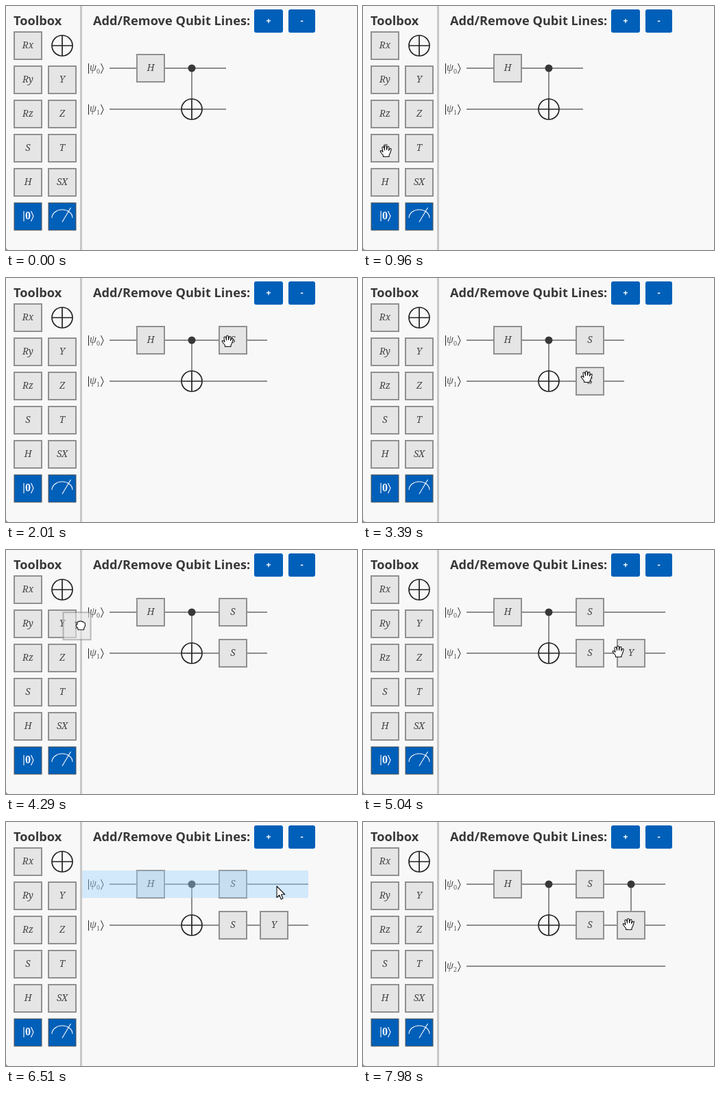
An HTML page that plays this animation: 512x357 px, repeating every 8000 ms.

```html
<!DOCTYPE html>
<html lang="en">
<head>
<meta charset="utf-8">
<title>Circuit editor</title>
<style>
html, body { margin: 0; width: 100%; height: 100%; overflow: hidden; background: #f8f8f8; }
svg { display: block; width: 512px; height: 357px; }
.ui { font-family: "Open Sans", "Noto Sans", sans-serif; }
.title { font-size: 18.2px; font-weight: 700; fill: #383838; }
.gate { font: italic 13.5px "Noto Serif", serif; fill: #444; text-anchor: middle; }
.ket { font: 10px "Liberation Serif", serif; fill: #555; text-anchor: middle; }
.psi { font-size: 16px; font-style: italic; }
.zero { font-size: 16px; font-weight: 700; fill: #fff; }
.line { stroke: #222; fill: none; }
.bold { stroke: #222; stroke-width: 1.7; fill: #f8f8f8; }
.white { stroke: #fff; stroke-width: 1.1; fill: none; }
</style>
</head>
<body>
<svg viewBox="0 0 512 357" xmlns="http://www.w3.org/2000/svg">
  <g id="panel"></g>
  <g id="scene"></g>
</svg>
<script>
const LOOP = 8000, BLUE = '#005fb8';
const panel = document.getElementById('panel');
const scene = document.getElementById('scene');

// Both grids give cell centres
const tool = (col, row) => [32 + 50 * col, 58 + 50 * row];
const slot = (col, row) => [211 + 60 * col, 91 + 60 * row];

const rect = (x, y, w, h, fill, more = '') =>
  `<rect x="${x}" y="${y}" width="${w}" height="${h}" fill="${fill}" ${more}/>`;
const path = (d, cls = 'line') => `<path d="${d}" class="${cls}"/>`;
const label = (x, y, s, cls) => `<text x="${x}" y="${y}" class="${cls}">${s}</text>`;
const box = ([x, y], fill, stroke) => rect(x - 20, y - 20, 40, 40, fill, stroke);
const gate = ([x, y], name) =>
  box([x, y], '#e5e5e5', 'stroke="#909090" stroke-width="2"') + label(x, y + 4, name, 'gate');
const control = ([x, y], end) =>
  path(`M${x} ${y}V${end}`) + `<circle cx="${x}" cy="${y}" r="5.5" fill="#383838"/>`;
const target = ([x, y]) => `<circle cx="${x}" cy="${y}" r="15" class="bold"/>` +
  path(`M${x - 15} ${y}h30M${x} ${y - 15}v30`, 'bold');
const bracket = (x, y, gap) => `M${x} ${y - 7}v15M${x + gap} ${y - 7}l3.5 7.5-3.5 7.5`;
const glow = (x, y, w) => rect(x, y, w, 40, '#99d0ff', 'opacity=".4"');

const wire = (row, end) => {
  const y = slot(0, row)[1];
  return path(bracket(120.5, y, 18)) + label(127, y + 4, 'ψ', 'ket psi') +
    label(134.5, y + 8, row, 'ket') + path(`M151 ${y}H${end}`);
};

const TOOLS = [['Rx'], ['Ry', 'Y'], ['Rz', 'Z'], ['S', 'T'], ['H', 'SX']]
  .flatMap((names, row) => names.map((name, col) => ({ name, at: tool(col, row) })));

function drawPanel() {
  const [zero, meter] = [0, 1].map(col => tool(col, 5));
  const edge = 'stroke="#555"';
  return label(11, 28, 'Toolbox', 'ui title') +
    label(127, 28, 'Add/Remove Qubit Lines:', 'ui title') +
    rect(108, 0, 3, 357, '#c8c8c8') +
    '<path d="M0 352Q0 357 5 357H0Z" fill="#999"/>' +
    TOOLS.map(g => gate(g.at, g.name)).join('') + target(tool(1, 0)) +
    box(zero, BLUE, edge) + label(zero[0], 312, '0', 'ket zero') +
    path(bracket(zero[0] - 6, 307, 10.5), 'white') +
    box(meter, BLUE, edge) + path('M67 310A15 12 0 0 1 97 310M82 316L94.5 295', 'white');
}

const ARROW = 'M0 0V16.5L3.8 13L6.3 19L9 17.8L6.5 12H11.8Z';
const OPEN = 'M5 17V15L1.5 10.5Q0 8.5 1.5 8Q3 8 4.5 10L3.5 4.5Q3.2 2.5 4.8 2.5Q6 2.6 6.3 4L7 7.5V2.2' +
  'Q7.2 .8 8.4 .8Q9.8 .8 9.8 2.2L10 7L11 3Q11.4 1.8 12.5 2Q13.8 2.4 13.5 3.8L13 8L14.5 5.5' +
  'Q15.4 4.6 16.3 5.2Q17 6 16.5 7.2L15 12L13.5 15V17Z';
const CLOSED = 'M5 17V15L2.5 12Q1.5 10 3 9.2L4 9V6.5Q4.3 4.8 6 5.2Q7 4 8.6 4.6Q10.2 4 11.3 5.2' +
  'Q13 4.8 13.6 6.4Q15.4 6.4 15.4 8.4V11.5L13.5 15V17Z';

// Pointer stops: leave, arrive, place, sideways bend of the way there
const ENTRY = [514, 37];
const STOPS = [
  [210, 960, [33, 212], -.05],
  [1020, 1770, [317, 102], .1],
  [1860, 2010, [323, 92], 0],
  [2280, 2310, [326, 92], 0],
  [2550, 3150, [326, 144], 0],
  [3390, 4050, [74, 104], -.08],
  [4050, 4170, [87, 105], 0],
  [4200, 4740, [372, 148], 0],
  [5070, 5190, [375, 156], 0],
  [5280, 5670, [424, 209], 0],
  [5760, 6480, [395, 94], .07],
  [6600, 7290, [383, 24], 0],
  [7440, 7950, [387, 149], -.05]
];

const DRAGS = [
  { start: 1020, drop: 1860, name: 'S', from: tool(0, 3), to: slot(2, 0), adds: true },
  { start: 2550, drop: 3150, name: 'S', from: slot(2, 0), to: slot(2, 1), adds: false },
  { start: 4200, drop: 4920, name: 'Y', from: tool(1, 1), to: slot(3, 1), adds: true }
];
const MENU = { open: 5220, close: 5730, items: ['Toggle Adjoint', 'Add Control', 'Delete'] };
const ADD_CONTROL = 6600, ADD_ROW = 7440;

function pointer(t) {
  const i = STOPS.findLastIndex(s => t >= s[0]);
  if (i < 0) return null;
  const [leave, arrive, to, bend] = STOPS[i];
  const from = i ? STOPS[i - 1][2] : ENTRY;
  const k = Math.min(1, (t - leave) / (arrive - leave));
  const u = k * k * (3 - 2 * k), side = 2 * u * (1 - u) * bend;
  const dx = to[0] - from[0], dy = to[1] - from[1];
  return [from[0] + dx * u - dy * side, from[1] + dy * u + dx * side];
}

const near = (a, b, r) => Math.abs(a[0] - b[0]) < r && Math.abs(a[1] - b[1]) < r;

function button(x, w, sign, hover) {
  return rect(x, 5, w, 34, hover ? '#0256a3' : BLUE, 'rx="3"') +
    `<text x="${x + w / 2}" y="26" class="ui" font-size="13" font-weight="700" fill="#fff" text-anchor="middle">${sign}</text>`;
}

function menu(p) {
  return rect(374, 157, 118, 108, '#000', 'rx="5" opacity=".08"') +
    rect(376, 157, 114, 105, '#fff', 'rx="4" stroke="#d8d8d8"') +
    MENU.items.map((s, i) => {
      const y = 157 + i * 35;
      const hover = p[0] > 376 && p[1] > y && p[1] < y + 35;
      return (hover ? rect(377, y + 1, 112, 33, '#ececec') : '') +
        `<text x="392" y="${y + 22}" class="ui" font-size="12" fill="#333">${s}</text>`;
    }).join('');
}

function ghost(drag, p) {
  const grip = pointer(drag.start);
  const at = drag.from.map((v, i) => v + p[i] - grip[i]);
  // A new column opens in the gap before its gate
  const zone = [drag.to[0] - (drag.adds ? 30 : 0), drag.to[1]];
  return (near(at, zone, 30) ? glow(zone[0] - 20, zone[1] - 20, 40) : '') +
    `<g opacity=".6">${gate(at, drag.name)}</g>`;
}

function cursor([x, y], shape) {
  const [dx, dy] = shape === ARROW ? [0, 0] : [8.5, 8.5];
  return `<path d="${shape}" transform="translate(${x - dx} ${y - dy})" ` +
    'fill="#fff" stroke="#111" stroke-width="1.1" stroke-linejoin="round"/>';
}

function draw(t) {
  const p = pointer(t);
  const dropped = DRAGS.filter(d => t >= d.drop);
  const gates = [{ name: 'H', at: slot(0, 0) }, ...dropped.map(d => ({ name: d.name, at: d.to }))];
  const drag = DRAGS.find(d => t >= d.start && t < d.drop);
  const menuOpen = t >= MENU.open && t < MENU.close;
  const end = 321 + 60 * dropped.filter(d => d.adds).length;
  const rows = t < ADD_ROW ? 2 : 3;

  let out = button(362, 42, '+', p && near(p, [383, 22], 18)) + button(412, 39, '-');
  for (let row = 0; row < rows; row++) out += wire(row, end);
  out += control(slot(1, 0), 136) + target(slot(1, 1));
  if (t >= ADD_CONTROL) out += control(slot(3, 0), 131);
  out += gates.map(g => gate(g.at, g.name)).join('');

  if (t >= MENU.close && t < ADD_CONTROL && p[1] < 111) out += glow(111, 71, end - 111);
  if (menuOpen) out += menu(p);
  if (drag) out += ghost(drag, p);
  if (p) {
    const over = !menuOpen && [...TOOLS, ...gates].some(g => near(p, g.at, 21));
    out += cursor(p, drag ? CLOSED : over ? OPEN : ARROW);
  }
  scene.innerHTML = out;
}

function tick() {
  draw(performance.now() % LOOP);
  requestAnimationFrame(tick);
}

panel.innerHTML = drawPanel();
tick();
</script>
</body>
</html>
```
